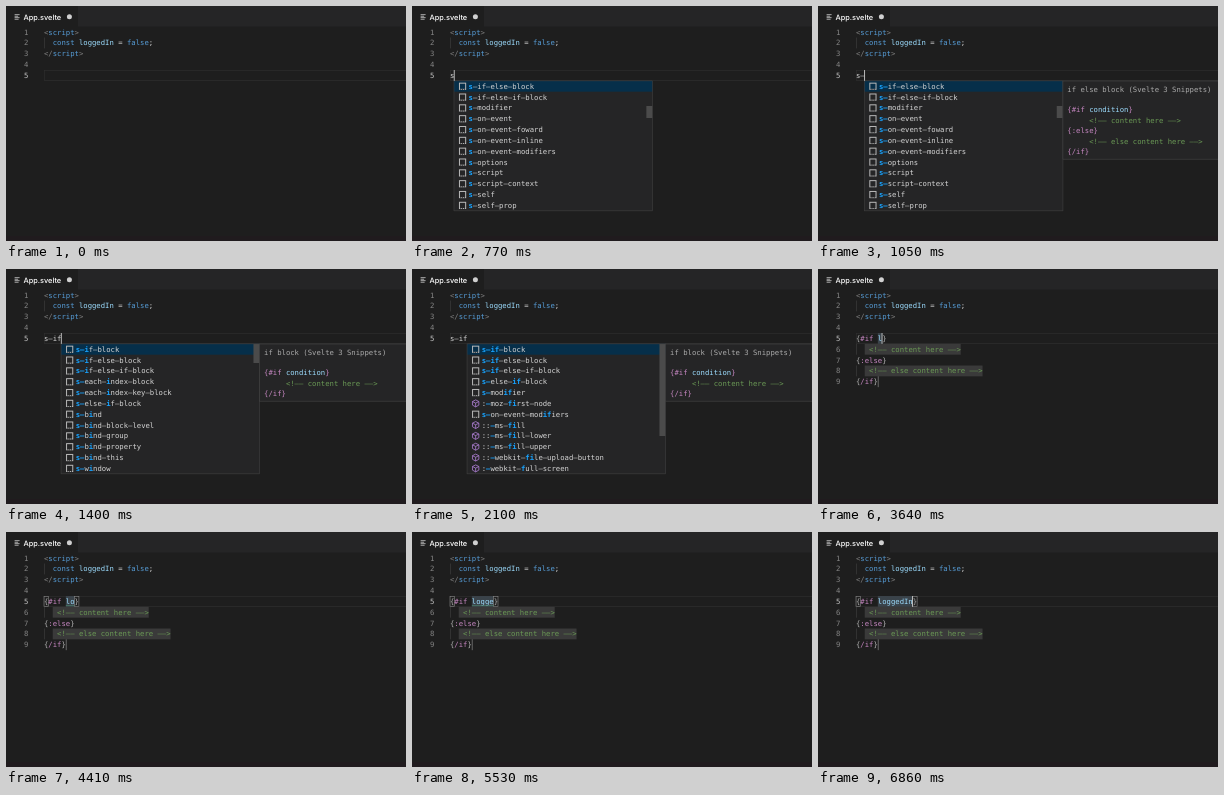
An HTML page with a canvas that plays this animation: 400 px wide and 235 px high, repeating every 6930 ms.

```html
<!DOCTYPE html>
<html lang="en">
<head>
<meta charset="utf-8">
<title>Snippet completion</title>
<style>
html, body { margin: 0; width: 100%; height: 100%; overflow: hidden; background: #1e1e1e; }
canvas { display: block; width: 400px; height: 235px; }
</style>
</head>
<body>
<canvas id="stage"></canvas>
<script>
const LOOP = 6930, CH = 4.364, ROW = 10.83, LEFT = 38, TOP = 20.7;
const MONO = '7.25px "DejaVu Sans Mono", monospace';
const BLUE = '#569cd6', VAR = '#9cdcfe', PINK = '#c586c0', GREEN = '#6a9955';
const TEXT = '#d4d4d4', TAG = '#808080', BRACE = '#b4b4b4', MATCH = '#18a3ff';

const canvas = document.getElementById('stage');
const ctx = canvas.getContext('2d');
const dpr = window.devicePixelRatio || 1;
canvas.width = 400 * dpr;
canvas.height = 235 * dpr;

// Square brackets mark the matched letters.
const dashList = ['if-else-block', 'if-else-if-block', 'modifier', 'on-event', 'on-event-foward',
  'on-event-inline', 'on-event-modifiers', 'options', 'script', 'script-context', 'self', 'self-prop'];
const menus = {
  s: { items: dashList.map(s => '[s]-' + s), thumb: [100, 12], hasElse: true },
  dash: { items: dashList.map(s => '[s-]' + s), thumb: [100, 12], hasElse: true },
  i: {
    items: ['[s-i]f-block', '[s-i]f-else-block', '[s-i]f-else-if-block', '[s-]each-[i]ndex-block',
      '[s-]each-[i]ndex-key-block', '[s-]else-[i]f-block', '[s-]b[i]nd', '[s-]b[i]nd-block-level',
      '[s-]b[i]nd-group', '[s-]b[i]nd-property', '[s-]b[i]nd-this', '[s-]w[i]ndow'],
    thumb: [75, 19]
  },
  if: {
    items: ['[s-if]-block', '[s-if]-else-block', '[s-if]-else-if-block', '[s-]else-[if]-block',
      '[s-]mod[if]ier', ':[-]moz-[fi]rst-node', '[s-]on-event-mod[if]iers', '::[-]ms-[fi]ll',
      '::[-]ms-[fi]ll-lower', '::[-]ms-[fi]ll-upper', '::[-]webkit-[fi]le-upload-button',
      ':[-]webkit-[f]ull-screen'],
    thumb: [75, 92]
  }
};

// Each step: time, typed text, menu, menu column, selected row, details shown.
const typing = [
  [0, ''], [700, 's'], [770, 's', 's', 1, 0, false], [840, 's', 's', 1, 0, true],
  [980, 's-', 's', 1, 0, true], [1050, 's-', 'dash', 2, 0, true], [1330, 's-i', 'dash', 2, 0, true],
  [1400, 's-if', 'i', 4, 0, true], [1470, 's-if', 'if', 4, 0, true], [2170, 's-if', 'if', 4, 1, true]
];
const words = [[2590, 'condition'], [3640, 'l'], [3920, 'lo'], [4830, 'log'], [5040, 'logg'],
  [5110, 'logge'], [5880, 'logged'], [6300, 'loggedI'], [6790, 'loggedIn']];
const cursorOn = [[490, 1960], [2450, 3150], [3640, 4410], [4830, 5530], [5880, LOOP]];

const stepAt = (steps, t) => steps.filter(s => s[0] <= t).pop();
const colX = col => LEFT + col * CH;
const lineY = line => TOP + (line - 1) * ROW;

function rect(x, y, w, h, color) {
  ctx.fillStyle = color;
  ctx.fillRect(x, y, w, h);
}

function frame(x, y, w, h, color, weight = 0.6) {
  ctx.strokeStyle = color;
  ctx.lineWidth = weight;
  ctx.strokeRect(x, y, w, h);
}

// Draws alternating text and colour arguments from x on one baseline.
function print(x, baseline, ...parts) {
  for (let i = 0; i < parts.length; i += 2) {
    const bold = parts[i + 1] === MATCH;
    ctx.font = (bold ? 'bold ' : '') + MONO;
    ctx.fillStyle = parts[i + 1];
    // The editor face has wide hyphens.
    ctx.fillText(parts[i].replace(/-/g, '–'), x, baseline);
    x += parts[i].length * CH;
  }
}

const code = (line, col, ...parts) => print(colX(col), lineY(line) + 7.9, ...parts);
const guide = line => rect(LEFT, lineY(line), 0.6, ROW, '#404040');

function drawChrome() {
  rect(0, 0, 400, 235, '#1e1e1e');
  rect(72, 0, 328, 20.5, '#252526');
  rect(0, 230, 400, 5, '#201b1e');
  [5, 3.5, 5, 4].forEach((w, i) => rect(8.6, 8.3 + i * 1.5, w, 0.8, '#c5c5c5'));
  ctx.font = '500 7.4px Inter, sans-serif';
  ctx.fillStyle = '#ffffff';
  ctx.fillText('App.svelte', 17.4, 13.5);
  ctx.fillStyle = '#d0d0d0';
  ctx.beginPath();
  ctx.arc(63.4, 10.8, 2.5, 0, 7);
  ctx.fill();
}

function drawBase(lineCount) {
  drawChrome();
  frame(LEFT + 0.5, lineY(5) + 0.3, 370, ROW - 0.5, '#303030');
  for (let n = 1; n <= lineCount; n++) {
    print(18, lineY(n) + 7.9, String(n), n === 5 ? '#c6c6c6' : '#858585');
  }
  guide(2);
  code(1, 0, '<', TAG, 'script', BLUE, '>', TAG);
  code(2, 2, 'const', BLUE, ' loggedIn', VAR, ' = ', TEXT, 'false', BLUE, ';', TEXT);
  code(3, 0, '</', TAG, 'script', BLUE, '>', TAG);
}

function drawIcon(x, y, isCube) {
  if (!isCube) {
    frame(x - 3.1, y - 3.1, 6.2, 6.2, '#b8b8b8', 1);
    for (let i = 0; i < 3; i++) rect(x - 2.2 + i * 1.8, y + 2.5, 0.8, 1.2, '#252526');
    return;
  }
  ctx.strokeStyle = '#b180d7';
  ctx.lineWidth = 0.8;
  ctx.stroke(new Path2D(`M${x} ${y - 3.5}l3.2 1.6v3.6l-3.2 1.8l-3.2-1.8v-3.6zM${x - 3.2} ${y - 1.9}l3.2 1.6l3.2-1.6m-3.2 1.6v3.8`));
}

function drawDetails(x, hasElse) {
  const title = `if ${hasElse ? 'else ' : ''}block (Svelte 3 Snippets)`;
  const rows = [
    [0, '{#if ', PINK, 'condition', VAR, '}', PINK],
    [5, '<!-- content here -->', GREEN],
    ...(hasElse ? [[0, '{:else}', PINK], [5, '<!-- else content here -->', GREEN]] : []),
    [0, '{/if}', PINK]
  ];
  const w = 165, h = hasElse ? 78.2 : 57.2;
  rect(x, 75, w, h, '#252526');
  frame(x, 75, w, h, '#454545');
  print(x + 4.4, 85.8, title, '#aaaaaa');
  rows.forEach(([indent, ...parts], i) => print(x + 4.4 + indent * CH, 106.1 + i * 10.55, ...parts));
}

function drawMenu(name, col, selected, details) {
  const { items, thumb, hasElse } = menus[name];
  const x = colX(col) - 0.4, y = lineY(6), w = 198.6, h = ROW * 12;
  rect(x, y, w, h, '#252526');
  rect(x, y + selected * ROW, w, ROW, '#062f4a');
  items.forEach((item, i) => {
    const mid = y + (i + 0.5) * ROW;
    drawIcon(x + 8.6, mid, item[0] === ':');
    print(x + 14.6, mid + 2.5, ...item.split(/[[\]]/).flatMap((s, k) => [s, k % 2 ? MATCH : TEXT]));
  });
  rect(x + w - 6.2, thumb[0], 6, thumb[1], '#4b4b4b');
  frame(x, y, w, h, '#404040');
  if (details) drawDetails(x + w, hasElse || selected === 1);
}

function drawSnippet(t) {
  const word = stepAt(words, t)[1];
  const end = 5 + word.length, y = lineY(5);
  const selected = t < 3640;
  rect(colX(5), y, word.length * CH, ROW, selected ? '#38638a' : '#3a434a');
  if (t >= 3710) {
    for (const col of [0, end]) frame(colX(col), y + 0.5, CH, ROW - 1, '#888888');
  }
  code(5, 0, '{', BRACE, '#if ', PINK, word, VAR, '}', BRACE);
  if (t >= 3780 && t < 6860) rect(colX(5), y + 9.4, word.length * CH, 0.7, '#4f8a70');

  [[6, '<!-- content here -->'], [8, '<!-- else content here -->']].forEach(([line, note]) => {
    guide(line);
    rect(colX(2), lineY(line), (note.length + 1) * CH, ROW, '#3a3a3a');
    code(line, 3, note, GREEN);
  });
  code(7, 0, '{', BRACE, ':else', PINK, '}', BRACE);
  code(9, 0, '{', BRACE, '/if', PINK, '}', BRACE);
  rect(colX(5), lineY(9), 0.7, ROW, '#858585');
  return end;
}

function draw(t) {
  ctx.setTransform(dpr, 0, 0, dpr, 0, 0);
  ctx.textRendering = 'geometricPrecision';
  const expanded = t >= 2590;
  drawBase(expanded ? 9 : 5);
  let cursor;
  if (expanded) {
    cursor = drawSnippet(t);
  } else {
    const [, text, menu, ...options] = stepAt(typing, t);
    code(5, 0, text, TEXT);
    if (menu) drawMenu(menu, ...options);
    cursor = text.length;
  }
  if (cursorOn.some(([from, to]) => t >= from && t < to)) {
    rect(colX(cursor) - 0.6, lineY(5), 0.9, ROW, '#c8c8c8');
  }
}

const start = performance.now();
function tick() {
  draw((performance.now() - start) % LOOP);
  requestAnimationFrame(tick);
}
tick();
</script>
</body>
</html>
```
